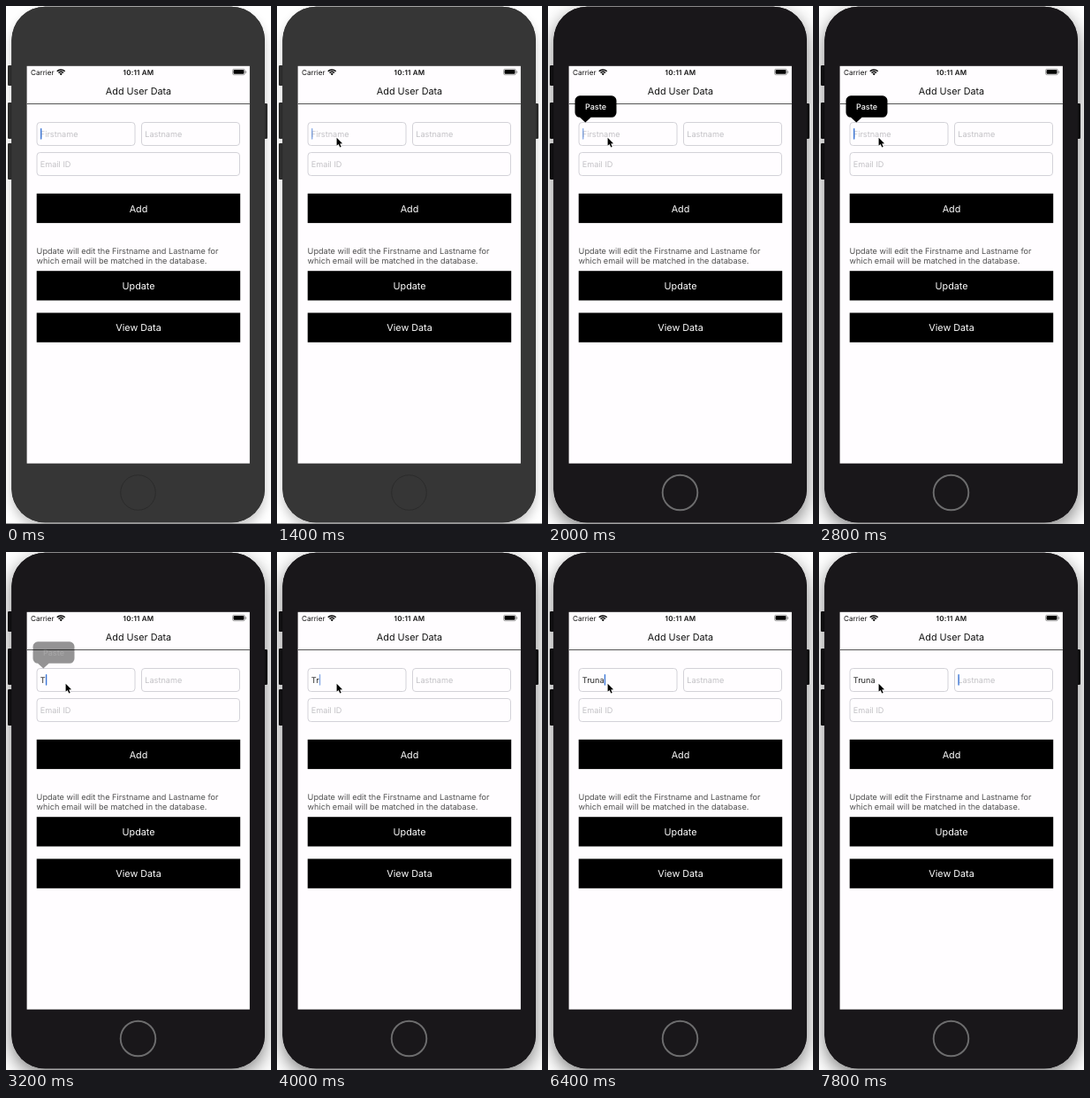
Recreate the animation shown at these times as an HTML page with a canvas. Size 300 by 585 pixels, loop 8 s.

```html
<!DOCTYPE html>
<html lang="en">
<head>
<meta charset="utf-8">
<title>Add User Data</title>
<style>
  html, body { margin: 0; width: 100%; height: 100%; overflow: hidden; background: #fff; }
  canvas { display: block; width: 300px; height: 585px; }
</style>
</head>
<body>
<canvas id="stage"></canvas>
<script>
const W = 300, H = 585, LOOP = 8000, TICK = 200;
const FONT = 'Inter, Roboto, "Liberation Sans", sans-serif';
const BODY_SIZE = 9.15, HEAD_SIZE = 10.8;
const canvas = document.getElementById('stage');
const ctx = canvas.getContext('2d');
const dpr = window.devicePixelRatio || 1;
canvas.width = W * dpr;
canvas.height = H * dpr;
ctx.textRendering = 'geometricPrecision';

const ACTIVE_AT = 1600, TAB_AT = 6800;
const typed = [
  [3200, 'T'], [3600, 'Tr'], [4200, 'Tra'], [5600, 'Tr'],
  [5800, 'Tru'], [6000, 'Trun'], [6200, 'Truna']
];

function box(x, y, w, h, r, fill, stroke, line = 1) {
  ctx.beginPath();
  ctx.roundRect(x, y, w, h, r);
  if (fill) { ctx.fillStyle = fill; ctx.fill(); }
  if (stroke) { ctx.strokeStyle = stroke; ctx.lineWidth = line; ctx.stroke(); }
}

function trace(points) {
  ctx.beginPath();
  points.forEach(([x, y]) => ctx.lineTo(x, y));
  ctx.closePath();
}

function setFont(size, weight = 400, spacing = 0) {
  ctx.font = `${weight} ${size}px ${FONT}`;
  ctx.letterSpacing = spacing + 'px';
}

function text(str, x, y, { size = BODY_SIZE, color = '#222', align = 'left', weight, spacing } = {}) {
  setFont(size, weight, spacing);
  ctx.textAlign = align;
  ctx.fillStyle = color;
  ctx.fillText(str, x, y);
}

function heading(str, y, color) {
  text(str, 150, y, { size: HEAD_SIZE, color, align: 'center' });
}

function phone(active) {
  ctx.fillStyle = '#fff';
  ctx.fillRect(0, 0, W, H);
  const body = active ? '#19171a' : '#363636';
  const side = active ? '#0f0e10' : '#2b2b2b';

  ctx.save();
  ctx.shadowColor = active ? 'rgba(0,0,0,.5)' : 'rgba(0,0,0,.22)';
  ctx.shadowBlur = (active ? 20 : 12) * dpr;
  ctx.shadowOffsetY = 7 * dpr;
  box(6.3, 0.7, 286.7, 582.6, 38, body);
  ctx.restore();

  [[2, 67, 23], [2, 109, 41], [2, 155, 41], [291, 110, 40]]
    .forEach(([x, y, h]) => box(x, y, 5, h, 1.2, side));
  box(6.3, 0.7, 286.7, 582.6, 38, body);
  if (!active) {
    ctx.fillStyle = '#999';
    ctx.fillRect(0, 584, W, 1);
  }

  ctx.beginPath();
  ctx.arc(149.5, 549.5, 19.8, 0, Math.PI * 2);
  ctx.strokeStyle = active ? '#6d6d6e' : '#2b2b2b';
  ctx.lineWidth = active ? 1.9 : 1;
  ctx.stroke();

  ctx.fillStyle = '#fffdff';
  ctx.fillRect(23.6, 67.8, 252.3, 448.8);
}

function statusBar() {
  text('Carrier', 28, 77.6, { size: 8.1, color: '#111' });
  text('10:11 AM', 150, 77.6, { size: 8, color: '#111', align: 'center', weight: 600, spacing: 0.2 });

  ctx.strokeStyle = '#000';
  ctx.lineWidth = 1.5;
  [6.1, 3.7].forEach(r => {
    ctx.beginPath();
    ctx.arc(62.2, 78, r, -Math.PI * 0.76, -Math.PI * 0.24);
    ctx.stroke();
  });
  trace([[62.2, 78.3], [60.5, 76.4], [62.2, 75.7], [63.9, 76.4]]);
  ctx.fillStyle = '#000';
  ctx.fill();

  box(256.5, 71.1, 14, 6.7, 1.8, null, '#888', 0.7);
  box(257.5, 72.1, 12, 4.7, 1, '#000');
  box(271.2, 73.3, 1, 2.4, 0.5, '#888');
}

function field(x, y, w, hint, value) {
  box(x + 0.5, y + 0.5, w - 1, 26, 3.5, '#fffdff', '#cecdd4', 0.9);
  text(value || hint, x + 4.3, y + 16.8, { color: value ? '#222' : '#c2c1c5' });
}

function button(label, y) {
  ctx.fillStyle = '#000';
  ctx.fillRect(34.7, y, 230.5, 33.3);
  heading(label, y + 20.8, '#fff');
}

function form(name) {
  heading('Add User Data', 100.2, '#111');
  ctx.fillStyle = '#555';
  ctx.fillRect(23.6, 110, 252.3, 1);
  field(34.5, 131, 112, 'Firstname', name);
  field(153, 131, 112, 'Lastname');
  field(34.5, 165, 230.5, 'Email ID');
  button('Add', 211.8);
  text('Update will edit the Firstname and Lastname for', 34.6, 280, { color: '#505050' });
  text('which email will be matched in the database.', 34.6, 291, { color: '#505050' });
  button('Update', 299.2);
  button('View Data', 346.5);
}

// Full for 400 ms, dimmed for 200 ms, hidden for 400 ms.
function blink(elapsed) {
  const phase = elapsed % 1000;
  return phase < 400 ? 1 : phase < 600 ? 0.6 : 0;
}

function caret(t, name) {
  const resets = [0, ACTIVE_AT, ...typed.map(k => k[0]), 6400, TAB_AT];
  const last = resets.filter(r => r <= t).pop();
  setFont(BODY_SIZE);
  const x = t >= TAB_AT ? 157.4 : 39 + ctx.measureText(name).width;
  ctx.globalAlpha = t === TAB_AT ? 0.6 : blink(t - last);
  box(x, 138, 1.4, 12.8, 0.7, '#3c76d6');
  ctx.globalAlpha = 1;
}

function pasteMenu(t) {
  if (t < 1800 || t >= 3400) return;
  const alpha = t < 2000 ? 0.5 : t >= 3200 ? 0.42 : 1;
  ctx.globalAlpha = alpha;
  ctx.beginPath();
  ctx.roundRect(30.5, 101.3, 47, 24.5, 5.5);
  ctx.moveTo(36, 125.8);
  ctx.lineTo(42.3, 131.5);
  ctx.lineTo(48.6, 125.8);
  ctx.fillStyle = '#000';
  ctx.fill();
  ctx.globalAlpha = alpha * alpha;
  text('Paste', 54, 117, { color: '#fff', align: 'center', weight: 500, size: 9 });
  ctx.globalAlpha = 1;
}

function pointer(t) {
  if (t < 400) return;
  const p = Math.min(1, (t - 400) / 1000);
  const left = (1 - p) ** 2;
  ctx.save();
  ctx.translate(67.6 - 3 * left, 148.8 + 65 * left);
  ctx.scale(0.87, 0.87);
  trace([[0, 0], [0, 10.4], [2.4, 8.2], [4.2, 12.3], [5.9, 11.6], [4.1, 7.6], [7.4, 7.5]]);
  ctx.lineJoin = 'round';
  ctx.lineWidth = 1.4;
  ctx.strokeStyle = '#fff';
  ctx.stroke();
  ctx.fillStyle = '#000';
  ctx.fill();
  ctx.restore();
}

function draw(now) {
  const t = Math.floor((now % LOOP) / TICK) * TICK;
  const key = typed.filter(k => k[0] <= t).pop();
  const name = key ? key[1] : '';
  ctx.setTransform(dpr, 0, 0, dpr, 0, 0);
  phone(t >= ACTIVE_AT);
  statusBar();
  form(name);
  caret(t, name);
  pasteMenu(t);
  pointer(t);
}

const start = performance.now();
function loop() {
  draw(performance.now() - start);
  requestAnimationFrame(loop);
}
loop();
</script>
</body>
</html>
```
